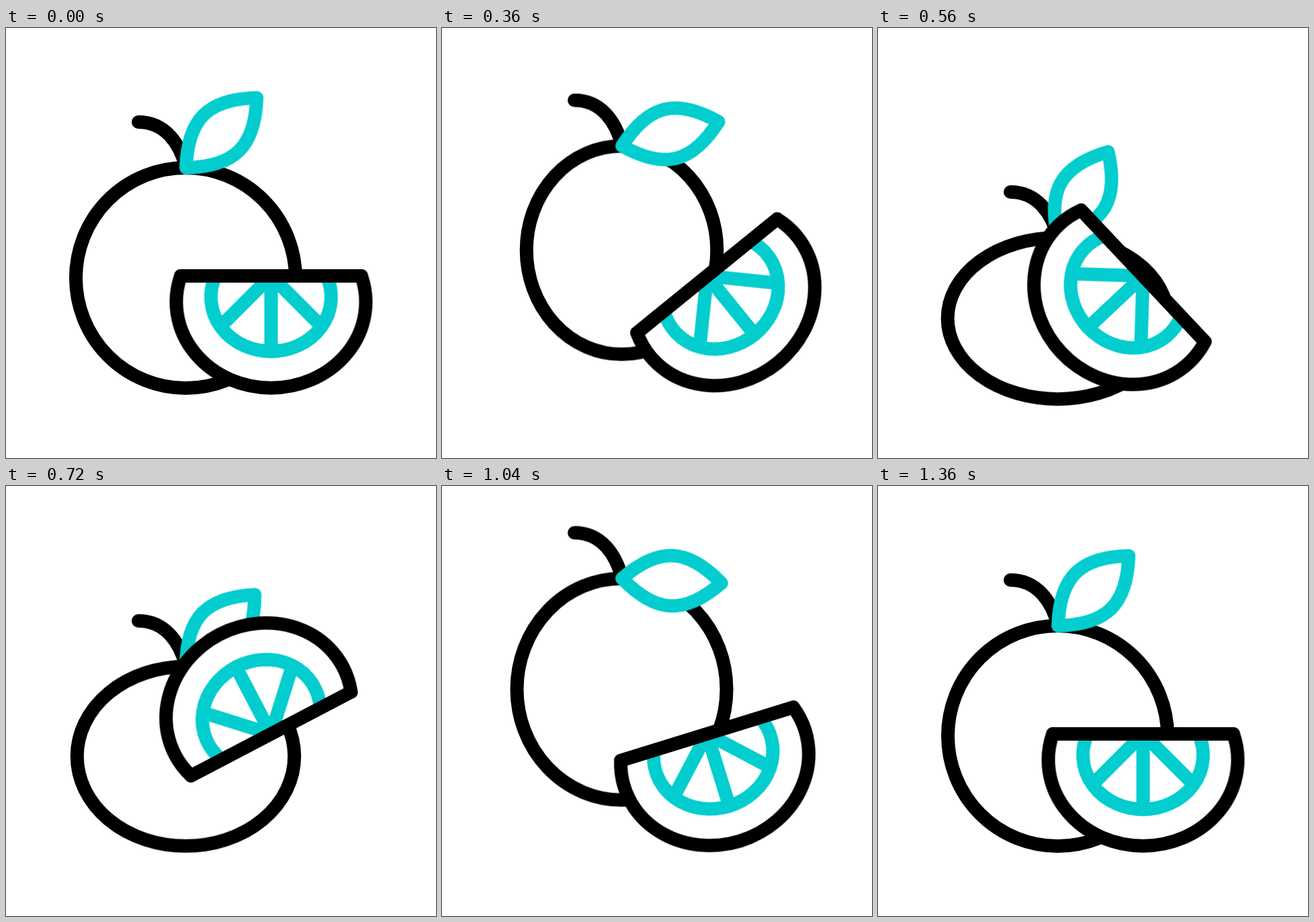
An HTML page without scripts for the animation above (2000 ms loop, 640 by 640 pixels).

```html
<!DOCTYPE html>
<html lang="en">
<head>
<meta charset="utf-8">
<title>Orange</title>
<style>
  :root {
    --ink: #000;
    --accent: #03cdce;
  }
  html, body {
    margin: 0;
    width: 100%;
    height: 100%;
    overflow: hidden;
    background: #fff;
  }
  svg {
    display: block;
    width: 100vw;
    height: 100vh;
    fill: none;
    stroke: var(--ink);
    stroke-width: 20;
    stroke-linecap: round;
    stroke-linejoin: round;
  }
  .accent { stroke: var(--accent); }
  .solid { fill: #fff; }
  .butt { stroke-linecap: butt; }

  .fruit, .peel, .leaf, .slice {
    animation: 2s cubic-bezier(.333, 0, .667, 1) infinite;
  }
  .fruit { animation-name: hop; }
  .peel { animation-name: squash; }
  .leaf { animation-name: flap; }
  .slice { animation-name: spin; }

  @keyframes hop {
    0%, 67.5%, 100% { transform: translateY(208px); }
    12% { transform: translateY(125px); }
    30.1% { transform: translateY(319px); }
    47.8% { transform: translateY(128px); }
  }
  @keyframes squash {
    0%, 67.5%, 100% { rx: 163.5px; ry: 164px; cy: 164px; }
    12% { rx: 133.6px; ry: 168px; cy: 168px; }
    30.1% {
      rx: 165px; ry: 118.3px; cy: 118.3px;
      animation-timing-function: cubic-bezier(.3, 0, .55, 1);
    }
    47.8% { rx: 155px; ry: 165px; cy: 165px; }
  }
  @keyframes flap {
    0%, 67.5%, 100% { transform: rotate(0deg); }
    12% { transform: rotate(47.5deg); }
    30.1% {
      transform: rotate(-17.4deg);
      animation-timing-function: cubic-bezier(.3, 0, .5, 1);
    }
    52% { transform: rotate(47.4deg); }
  }
  @keyframes spin {
    0% { transform: rotate(0deg); }
    18% {
      transform: rotate(-39.1deg);
      animation-timing-function: cubic-bezier(.22, 0, .667, .566);
    }
    36% {
      transform: rotate(151.7deg);
      animation-timing-function: cubic-bezier(.333, .44, .705, 1);
    }
    56.5%, 100% { transform: rotate(360deg); }
  }
</style>
</head>
<body>
<svg viewBox="0 0 640 640">
  <g class="fruit">
    <ellipse class="peel" cx="267.5" cy="164" rx="163.5" ry="164"/>
    <path d="M197-68c40 0 62 32 71 68"/>
    <g transform="translate(268) rotate(-44.7)">
      <path class="leaf accent solid" d="M0 0C53-50 95-50 148 0C95 50 53 50 0 0Z"/>
    </g>
  </g>
  <g transform="translate(394.5 369)">
    <g class="slice">
      <path class="solid" d="M-134.4 0H134.4A141 128 0 1 1-134.4 0Z"/>
      <g class="accent butt">
        <path d="M-82.5 0A89.5 81 0 1 0 82.5 0"/>
        <path d="M0 0V113M0 0L75 75M0 0L-75 75"/>
      </g>
      <path d="M-134.4 0H134.4"/>
    </g>
  </g>
</svg>
</body>
</html>
```
